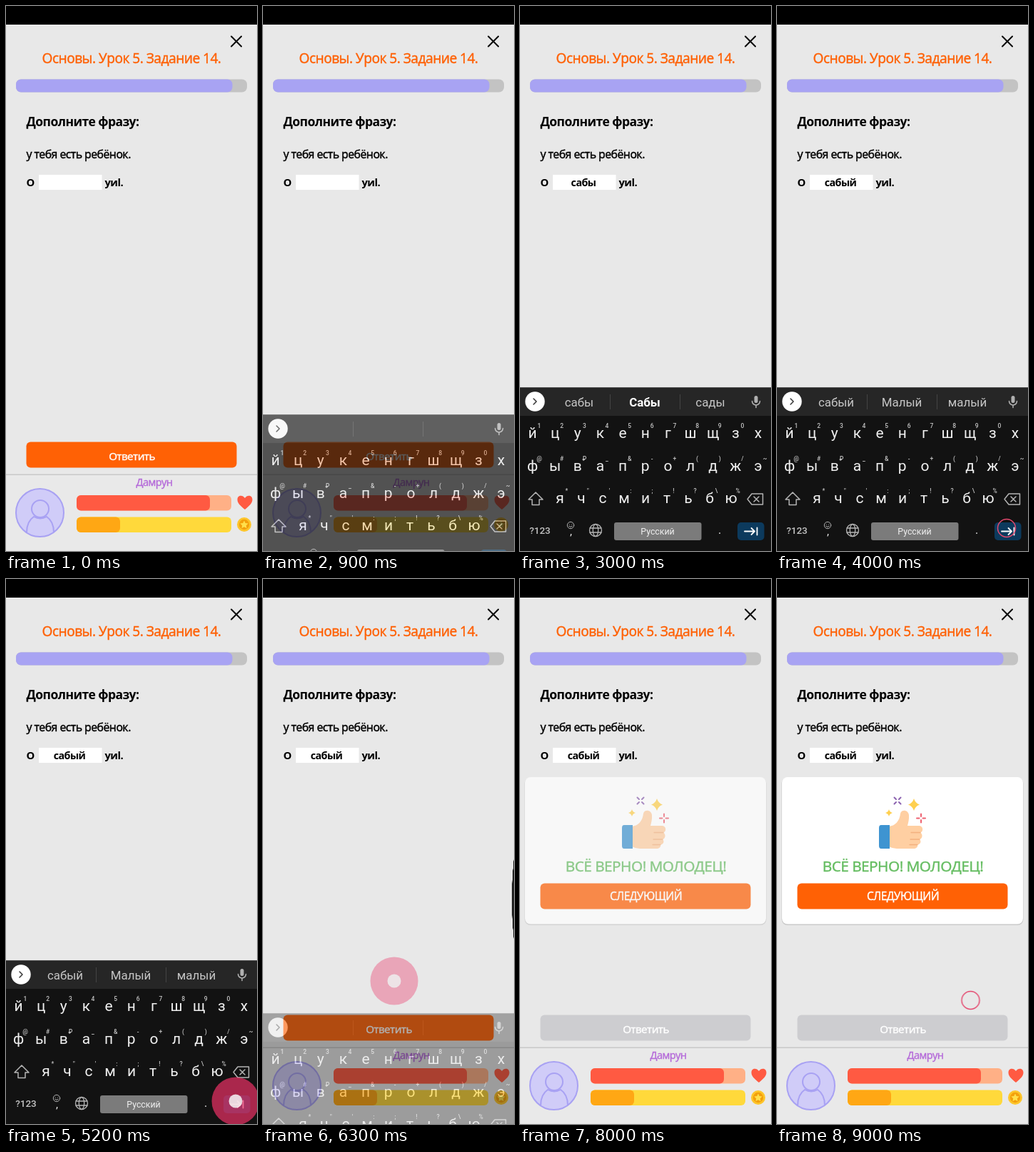
Recreate the animation shown at these times as an HTML page. Size 352 by 762 pixels, loop 9100 ms.

```html
<!DOCTYPE html>
<html lang="ru">
<head>
<meta charset="utf-8">
<title>Урок</title>
<style>
  html, body { margin: 0; width: 100%; height: 100%; overflow: hidden; background: #e8e8e8; }
  svg { display: block; width: 352px; height: 762px; }
  .app { font-family: "Noto Sans", "Open Sans", sans-serif; letter-spacing: -.035em; }
  .mid { text-anchor: middle; }
  .bold { font-weight: 700; }
  .medium { fill: currentColor; stroke: currentColor; stroke-width: .35px; }
  .keys { font-family: Roboto, sans-serif; text-anchor: middle; fill: #f0f0f0; }
  .line { fill: none; stroke: #b4b4b4; stroke-width: 1.5; stroke-linecap: round; stroke-linejoin: round; }
  #card, #kb, #edge { opacity: 0; }
</style>
</head>
<body>
<svg viewBox="0 0 352 762">
  <rect width="352" height="762" fill="#e8e8e8"/>
  <rect width="352" height="26"/>
  <path d="M316 42.5l14 14m0-14l-14 14" stroke="#000" stroke-width="2" stroke-linecap="round"/>

  <g class="app">
    <text class="mid medium" x="176" y="80" font-size="19.1" color="#ff6105">Основы. Урок 5. Задание 14.</text>
    <rect x="14" y="102.5" width="324" height="18" rx="7" fill="#c3c3c3"/>
    <rect x="14" y="102.5" width="303.5" height="18" rx="7" fill="#a8a3f3"/>
    <text class="bold" x="28.5" y="168" font-size="17.5">Дополните фразу:</text>
    <text class="medium" x="28.5" y="213" font-size="15.8">у тебя есть ребёнок.</text>
    <text class="bold" x="28.5" y="252" font-size="14.8">О</text>
    <rect x="46" y="236" width="88.5" height="21" fill="#fff"/>
    <g id="field" class="mid bold" font-size="14.3"></g>
    <text class="bold" x="138.5" y="252" font-size="14.8">уиl.</text>

    <rect id="answer" x="28.5" y="609.5" width="295" height="36" rx="6" fill="#ff6105"/>
    <text class="mid medium" x="176.5" y="635" font-size="15.1" color="#fff">Ответить</text>

    <rect y="655" width="352" height="107" fill="#e9e9e9"/>
    <rect y="654.5" width="352" height="1.5" fill="#c8c8c8"/>
    <text class="mid medium" x="208" y="671" font-size="14.5" color="#b56bd9">Дамрун</text>
    <g fill="#d0ccf8" stroke="#a8a1f3" stroke-width="2">
      <circle cx="47.5" cy="708.5" r="33.5"/>
      <circle cx="48" cy="703" r="12"/>
      <path fill="none" d="M29 736C29 724 33 718 39 714Q48 719 57 714C63 718 67 724 67 736"/>
    </g>
    <rect x="99" y="684" width="217" height="21.5" rx="6" fill="#ffb086"/>
    <rect x="99" y="684" width="187" height="21.5" rx="6" fill="#ff5a42"/>
    <rect x="99" y="714.5" width="217" height="21.5" rx="6" fill="#ffd93b"/>
    <rect x="99" y="714.5" width="61" height="21.5" rx="6" fill="#ffa714"/>
    <path fill="#ff5a42" d="M335 704C328 698 324.5 695 324.5 690C324.5 683.5 332 683 335 688C338 683 345.5 683.5 345.5 690C345.5 695 342 698 335 704Z"/>
    <circle cx="334" cy="725" r="10" fill="#fdc52a"/>
    <circle cx="334" cy="725" r="7.2" fill="#f3a00c"/>
    <path fill="#ffe04c" d="M334 719.5l1.7 3.6 4 .5-2.9 2.7.7 3.9-3.5-1.9-3.5 1.900.7-3.9-2.9-2.7 4-.5z"/>

    <g id="card">
      <rect x="6.5" y="278" width="339" height="206" rx="8" opacity=".13"/>
      <rect x="7" y="277" width="338" height="205.5" rx="8" fill="#fff"/>
      <path fill="#ffcfa2" d="M157 346C166 345 172 338 173 328C174 322 184 322 185 330C185.5 336 184 341 183 345H199C205 345 206 353 201 354.5C205 357 204 363 200 364C203 367 201 371 197 371.5C198 375 195 377 191 377H168Q162 377 157 374Z"/>
      <path fill="none" stroke="#f3b17f" stroke-width="1.3" stroke-linecap="round" d="M188 354.5h13M187 364h13M186 371.5h11"/>
      <path fill="#3e94d1" d="M158 344v33h-12q-3 0-3-4v-25q0-4 3-4z"/>
      <path fill="#ffd04f" d="M192 307q2 6.5 8 8.500-6 2-8 8.500-2-6.500-8-8.500 6-2 8-8.500zM157 322q1 4 5 5-4 1-5 5-1-4-5-5 4-1 5-5z"/>
      <path stroke="#8c63b0" stroke-width="2" stroke-linecap="round" d="M164.5 305.5l2.5 2.5m4 4l2.5 2.5m0-9l-2.5 2.5m-4 4l-2.5 2.5"/>
      <path stroke="#ee6170" stroke-width="2" stroke-linecap="round" d="M202 328.5v3.5m0 5v3.5m-6-6h3.5m5 0h3.5"/>
      <text class="mid medium" x="176.5" y="409" font-size="20.8" color="#66bd62">ВСЁ ВЕРНО! МОЛОДЕЦ!</text>
      <rect x="28.5" y="425.5" width="295" height="36" rx="6" fill="#ff6105"/>
      <text class="mid medium" x="176.5" y="449" font-size="15.5" color="#fff">СЛЕДУЮЩИЙ</text>
    </g>
  </g>

  <g id="kb" class="keys">
    <rect y="533.5" width="352" height="228.5" fill="#121212"/>
    <rect y="533.5" width="352" height="39.5" fill="#262626"/>
    <circle cx="21" cy="553" r="13.7" fill="#fff"/>
    <path class="line" style="stroke:#333" d="M19 549l4 4-4 4"/>
    <path stroke="#444" d="M126.5 543v21M224.5 543v21"/>
    <g id="words" font-size="16.9"></g>
    <rect x="328.5" y="545" width="5" height="10" rx="2.5" fill="#b0b0b0"/>
    <path class="line" d="M325.5 552.5a5.5 5.5 0 0 0 11 0M331 558.5v3"/>
    <g id="letters"></g>
    <path class="line" d="M22 680l10 10h-5v7.5h-10v-7.5h-5z"/>
    <path class="line" d="M325 682h15.5v15H325l-6-7.5zM328 686l7 7m0-7l-7 7"/>
    <text x="28" y="738" font-size="13.5" font-weight="500" fill="#c4c4c4">?123</text>
    <g class="line" style="stroke-width:1">
      <circle cx="71" cy="726" r="4.7"/>
      <path d="M69.3 724.8v.1m3.4-.1v.1M68.7 727.3q2.3 2.5 4.6 0"/>
    </g>
    <text x="71.5" y="740" font-size="15">,</text>
    <g class="line" style="stroke-width:1.3">
      <circle cx="106" cy="733" r="8.5"/>
      <ellipse cx="106" cy="733" rx="3.7" ry="8.5"/>
      <path d="M98 730h16M98 736h16"/>
    </g>
    <rect x="132" y="722" width="122.5" height="25" rx="3" fill="#7b7b7b"/>
    <text x="193" y="739" font-size="12.3">Русский</text>
    <text x="280" y="738" font-size="16">.</text>
    <rect x="305" y="722" width="37.5" height="25" rx="5" fill="#0c3a5d"/>
    <path class="line" style="stroke:#fff;stroke-width:1.8" d="M315 734.5h14m-4.5-4.5l4.5 4.5-4.5 4.5M332.5 729.5v10"/>
  </g>

  <path id="edge" fill="#222" d="M1 348C0 395-1 410-1 448S0 500 1 546Z"/>
  <g id="taps"></g>
</svg>

<script>
const LOOP = 9100;
const $ = id => document.getElementById(id);

function add(parent, tag, attrs, text = '') {
  const el = document.createElementNS('http://www.w3.org/2000/svg', tag);
  for (const name in attrs) el.setAttribute(name, attrs[name]);
  el.textContent = text;
  return parent.appendChild(el);
}

// Holds each value of [time, value] until the next one.
function hold(el, prop, rest, ...steps) {
  const all = [[0, rest], ...steps, [LOOP, steps.at(-1)[1]]];
  el.animate(all.map(([t, v]) => ({ [prop]: v, offset: t / LOOP, easing: 'step-end' })),
    { duration: LOOP, iterations: Infinity });
}

const show = (el, from, to = LOOP) => hold(el, 'opacity', 0, [from, 1], [to, to < LOOP ? 0 : 1]);

// Keyboard letters with their small hints
function keyRow(letters, hints, x, step, y) {
  [...letters].forEach((c, i) => {
    add($('letters'), 'text', { x: x + i * step, y, 'font-size': 21 }, c);
    add($('letters'), 'text', {
      x: x + i * step + 9.5, y: y - 14,
      'font-size': 8.5, 'font-weight': 500, fill: '#c4c4c4'
    }, hints[i] || '');
  });
}
keyRow('йцукенгшщзх', '1234567890', 17.5, 31.65, 604);
keyRow('фывапролджэ', '@#₽_&-+()/~', 17.5, 31.65, 650);
keyRow('ячсмитьбю', '*"\':;!?\\%', 56, 30, 695);

// Typing: time, field text, suggestions
const typing = [
  [1800, 'с', 'с', 'С', 'со'],
  [2000, 'са', 'са', 'ма', 'сам'],
  [2500, 'саб', 'саб', 'Саб', 'сад'],
  [2800, 'сабы', 'сабы', 'Сабы', 'сады'],
  [3300, 'сабый', 'сабый', 'Малый', 'малый']
];
typing.forEach(([from, text, ...words], i) => {
  const to = typing[i + 1]?.[0];
  show(add($('field'), 'text', { x: 89, y: 252, opacity: 0 }, text), from, to);
  const group = add($('words'), 'g', { opacity: 0 });
  words.forEach((word, n) => {
    const strong = n === 1 && to;
    add(group, 'text', {
      x: 83 + n * 92, y: 560,
      fill: strong ? '#fff' : '#c6c6c6', 'font-weight': strong ? 700 : 400
    }, word);
  });
  show(group, from, to ?? 6200);
});

const down = y => `translate(0px, ${y}px)`;
hold($('kb'), 'opacity', 0, [800, .2], [900, .7], [1000, 1], [6200, .75], [6300, .36], [6400, .1], [6500, 0]);
hold($('kb'), 'transform', down(100), [800, down(95)], [900, down(38)], [1000, down(8)], [1100, down(0)],
  [6200, down(28)], [6300, down(74)], [6400, down(105)]);

const bulge = w => `translate(352px, 0px) scale(${w}, 1)`;
show($('edge'), 6000, 6400);
hold($('edge'), 'transform', bulge(1), [6000, bulge(8)], [6100, bulge(24)], [6200, bulge(14)], [6300, bulge(3)]);

hold($('card'), 'opacity', 0, [7700, .12], [7800, .3], [7900, .5], [8000, .7], [8100, .85], [8200, .95], [8300, 1]);
hold($('answer'), 'fill', '#ff6105', [7700, '#cdcdd0']);

// A touch: thin ring, then a full disc, then a pale one
function tap(x, y, start, full = start + 100, fade = full + 100, end = fade + 100) {
  const group = add($('taps'), 'g', { transform: `translate(${x} ${y})` });
  const ring = add(group, 'circle', { r: 12.5, fill: 'none', stroke: '#e4496f', 'stroke-width': 1.5, opacity: 0 });
  show(ring, start, Math.min(full, LOOP));
  if (full >= LOOP) return group;
  const disc = add(group, 'g', { opacity: 0 });
  add(disc, 'circle', { r: 33.5, fill: '#ec3165', 'fill-opacity': .7 });
  add(disc, 'circle', { r: 9.5, fill: '#f4f4f4', 'fill-opacity': .85 });
  hold(disc, 'opacity', 0, [full, 1], [fade, .52], [end, 0]);
  return group;
}
tap(81, 250, 100);
tap(120, 697, 1700, 1800, 2000, 2300);
tap(117, 645, 2000, 2300);
tap(266, 694, 2400);
tap(49, 647, 2700);
tap(17, 583, 3200);
tap(322, 730, 4000);
tap(322, 730, 5000, 5100, 5300);
tap(180, 628, 6800, 6900, 7100, 7300);
tap(271.5, 589, 9000);

const at = (x, y) => `translate(${x}px, ${y}px)`;
hold(tap(345, 450, 6000, 6100, 6300), 'transform', at(345, 450),
  [6100, at(284, 475)], [6200, at(216, 533)], [6300, at(184, 562)]);
</script>
</body>
</html>
```
